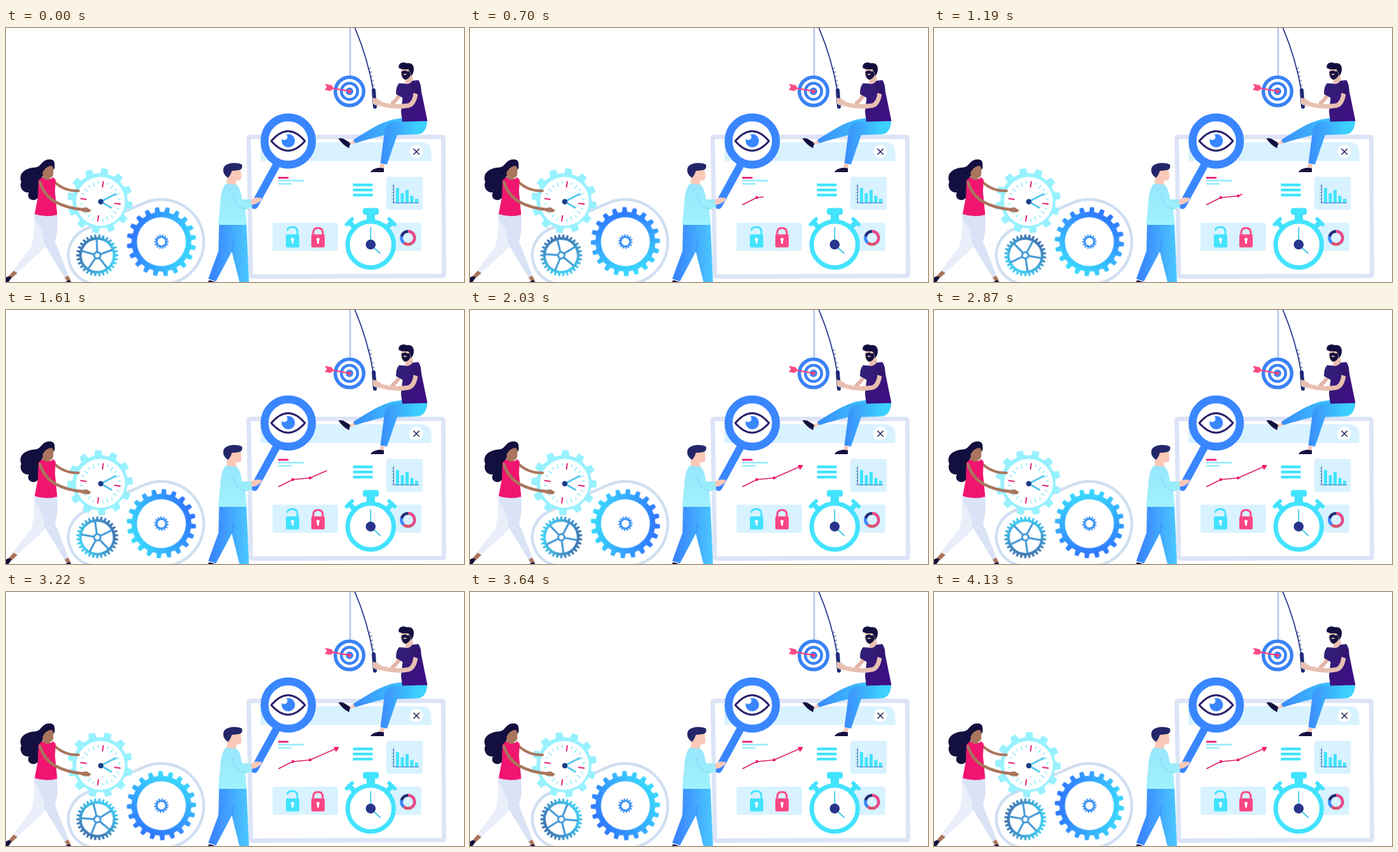
Write an HTML page that moves like this. It is 720x400 px and loops after 4.2 s.

```html
<!DOCTYPE html>
<html lang="en">
<head>
<meta charset="utf-8">
<title>Teamwork</title>
<style>
  html, body { margin: 0; width: 100%; height: 100%; overflow: hidden; background: #fff; }
  svg { display: block; width: 720px; height: 400px; }
  .spin { transform-origin: 0 0; animation: spin 4.2s steps(60) infinite; }
  #wipe rect { transform-origin: 428px 0; animation: wipe 4.2s infinite; }
  .line { fill: none; stroke-linecap: round; stroke-linejoin: round; }
  .navy { fill: #13103f; }
  .pale { fill: #d9f2ff; }
  .cyan { fill: #42e3ff; }
  .pink { fill: #f0166f; }
  .blue { fill: #3a86ff; }
  .brown { fill: #a9755d; }
  .peach { fill: #fbc8b8; }
  .tan { fill: #e8c0b0; }
  @keyframes spin { to { transform: rotate(360deg); } }
  @keyframes wipe {
    0% { transform: scaleX(0); animation-timing-function: steps(29); }
    48.3333%, 100% { transform: scaleX(1); }
  }
</style>
</head>
<body>
<svg viewBox="0 0 720 400">
  <defs>
    <linearGradient id="bigFill" gradientTransform="rotate(15 .5 .5)">
      <stop offset=".05" stop-color="#2f78ff"/><stop offset="1" stop-color="#3bdcff"/>
    </linearGradient>
    <linearGradient id="smallFill" gradientTransform="rotate(20 .5 .5)">
      <stop offset="0" stop-color="#3d6fae"/><stop offset="1" stop-color="#43d4fa"/>
    </linearGradient>
    <linearGradient id="jeans">
      <stop offset=".1" stop-color="#3985fd"/><stop offset="1" stop-color="#4bc8ff"/>
    </linearGradient>
    <linearGradient id="seat">
      <stop offset="0" stop-color="#3b8cfa"/><stop offset=".8" stop-color="#3cd0ff"/>
    </linearGradient>
    <linearGradient id="purple" x2="1" y2="1">
      <stop offset="0" stop-color="#2e2372"/><stop offset="1" stop-color="#420a86"/>
    </linearGradient>
    <linearGradient id="aqua" x2="0" y2="1">
      <stop offset="0" stop-color="#98e6fb"/><stop offset="1" stop-color="#a0f2fe"/>
    </linearGradient>
    <clipPath id="wipe"><rect x="428" y="236" width="96.6" height="48"/></clipPath>
  </defs>

  <!-- window -->
  <path d="M384 171.500H685Q687.500 171.500 687.500 174L688.500 388Q688.500 390.500 686 390.500L387.500 391.500Q385 391.500 385 389L381.500 174Q381.500 171.500 384 171.500Z" fill="#fff" stroke="#dce4f6" stroke-width="7"/>
  <path class="pale" d="M400 180H654Q668.500 181 668.500 196V209.500H400Z"/>
  <circle cx="645" cy="194.500" r="10.500" fill="#fff"/>
  <path class="line" d="M641 190.500l8.500 8.500m0-8.500l-8.500 8.500" stroke="#1c2058" stroke-width="1.500"/>
  <path class="pink" d="M428 234.500h16v2.800h-16z"/>
  <path d="M428 239h41v2.700h-41zM428 244h21v2.700h-21z" fill="#9cecff"/>
  <path class="cyan" d="M545.500 245h31v4.200h-31zM545.500 253h31v4.200h-31zM545.500 261h31v4.200h-31z"/>

  <g clip-path="url(#wipe)">
    <path class="line" d="M428 278.500L451 267 478 264.500 519 246.500" stroke="#e01c6c" stroke-width="1.600"/>
    <circle class="pink" cx="451" cy="267" r="2.300"/>
    <circle class="pink" cx="478" cy="264.500" r="2.300"/>
    <path class="pink" d="M524 244.300L515 244 518.800 252Z"/>
  </g>

  <rect class="pale" x="598" y="234.500" width="57" height="52" rx="3"/>
  <path class="line" d="M609.500 246v29.500h39.500M607 249h2.500m-2.500 5h2.500m-2.500 5h2.500m-2.500 5h2.500m-2.500 5h2.500m-2.500 5h2.500" stroke="#3b75c4"/>
  <path class="cyan" d="M613 252h5v23h-5zM620.500 260h5v15h-5zM628 255h5v20h-5zM635.500 264.500h5v10.500h-5zM643 269h5v6h-5z"/>

  <rect class="pale" x="419" y="306.500" width="103" height="44.500" rx="3"/>
  <g id="locks">
    <path class="line" d="M442.500 318Q443.500 313.500 450 313.500Q457.500 313.500 458 320V326" stroke="#42e3ff" stroke-width="3"/>
    <rect class="cyan" x="440" y="325" width="21" height="20.500" rx="2"/>
    <path class="line" d="M483 326V322Q483 315 490.500 315T498 322V326" stroke="#fa4684" stroke-width="3"/>
    <rect x="480" y="325" width="21" height="20.500" rx="2" fill="#fa4684"/>
    <path d="M449 334.500h3v5h-3zM489 334.500h3v5h-3z" fill="#fff"/>
    <circle cx="450.500" cy="333" r="2.600" fill="#fff"/><circle cx="490.500" cy="333" r="2.600" fill="#fff"/>
  </g>

  <rect class="pale" x="600" y="306.500" width="53" height="44.500" rx="3"/>
  <g fill="none" stroke-width="4.500">
    <circle cx="632" cy="330.500" r="10.300" stroke="#42d9fb"/>
    <path d="M632 320.200A10.300 10.300 0 0 1 638 338.900" stroke="#f04481"/>
    <path d="M638 338.900A10.300 10.300 0 0 1 625 338" stroke="#e0506f"/>
    <path d="M625 338A10.300 10.300 0 0 1 622 328" stroke="#3a86ff"/>
    <path d="M622 328A10.300 10.300 0 0 1 632 320.200" stroke="#2a2c70"/>
  </g>

  <!-- stopwatch -->
  <path class="line" d="M540 306l9 9M606.500 306l-9 9" stroke="#42e3ff" stroke-width="8" stroke-linecap="butt"/>
  <path class="line" d="M535.500 309.500l8.500-8.500M611 309.500l-8.500-8.500" stroke="#42e3ff" stroke-width="6"/>
  <path class="cyan" d="M567 290h13v14h-13z"/>
  <rect class="cyan" x="561" y="283.500" width="25" height="10.500" rx="4"/>
  <circle cx="573.300" cy="341" r="36.200" fill="#fff" stroke="#42e3ff" stroke-width="7"/>
  <path class="line" d="M573.300 341V314.500M573.300 341L588 355" stroke="#3bcbe6" stroke-width="1.800"/>
  <circle cx="573.300" cy="341" r="7.800" fill="#27358c"/>

  <!-- angler -->
  <path class="line" d="M541 0V77" stroke="#6b8ed6" stroke-width="1.200"/>
  <path class="line" d="M548.500 0Q568 45 578 101" stroke="#273a8f" stroke-width="1.800"/>
  <path class="line" d="M570 64l3-1M572 70l3-1M573 77l3-1M574.500 84l3-1M576 91l3-1" stroke="#273a8f"/>
  <path class="line" d="M578 98L580 124" stroke="#1f2a78" stroke-width="6" stroke-linecap="butt"/>
  <circle cx="540" cy="99.700" r="22.300" fill="#fff" stroke="#3a82f5" stroke-width="5.500"/>
  <circle cx="540" cy="99.700" r="12.800" fill="#fff" stroke="#3a82f5" stroke-width="4.500"/>
  <circle class="blue" cx="540" cy="99.700" r="6"/>
  <circle cx="540" cy="99.700" r="3" fill="#f73f78"/>
  <path class="line" d="M511 94.500L540 99.700" stroke="#f73f78" stroke-width="2.200"/>
  <path d="M501 88L512 90 515 95 510.500 99 501 97.500 504.500 93Z" fill="#fb4c80"/>

  <path d="M662 147L626 142C600 143 584 152 545.500 176.500L549 181.500C580 172 605 166 628 160Z" fill="url(#seat)"/>
  <path d="M662 146L630 146C605 146 597 151 595 164L588.500 213 599 215 615 168.500 648 167.500C658 166 662 156 662 146Z" fill="url(#seat)"/>
  <path class="navy" d="M522.500 174Q529 172.500 534 176.500L543 182Q539 184 539.500 189.500Q529 184 522.500 174ZM573 227Q575 222 586 220L594 220.500V227Z"/>
  <path class="peach" d="M540 181l6-4 3 4.500-7 2zM588 213.500l7 1-1 6-6-.5z"/>
  <path class="line" d="M619 104Q616 112 608 118" stroke="#e3b4a6" stroke-width="6"/>
  <path class="tan" d="M628 76h11l1 10q-6 5-12 3z"/>
  <path class="tan" d="M621 62H638L638 75Q634 82 627 81.500Q621.500 80 621.500 73Z"/>
  <path d="M627 87.500Q634 90 639 83L648 82Q652 85 653 100L662.500 146.500 623 147.500 621 132 623.500 110 613 104Q613 92 618 87Z" fill="url(#purple)"/>
  <path class="navy" d="M617.500 63C616 55 624 52.500 630 55.500C640 54 643 62 640 71L637 76Q636 68 632 65Q623 66 617.500 63Z"/>
  <path class="navy" d="M621.500 69Q627 65.500 631 68.500L634.500 68 636 74Q633 81 627.500 81.500Q621.500 79 621.500 69Z"/>
  <path class="tan" d="M624 73q4-2 6.500 0-3.500 2-6.500 0z"/>
  <path class="line" d="M644 103Q642 119 633 122Q611 126 587 119" stroke="#e8c0b0" stroke-width="7"/>
  <path class="tan" d="M576.500 110Q584 110 590 116L589 122Q581 123 577 119Z"/>
  <path d="M635 100L651.500 106 652 90 639 87Z" fill="#32176f"/>

  <!-- belt and gears -->
  <path class="line" d="M143 403A45 45 0 0 1 124.700 316.900L216.700 275.800A67 67 0 1 1 244 404" stroke="#cfdff0" stroke-width="4.500"/>
  <g id="gears"></g>

  <!-- clock face -->
  <circle cx="148.500" cy="273" r="38.500" fill="#fff"/>
  <g id="ticks" transform="translate(148.500 273)"></g>
  <path class="line" d="M149 273.500L172 261.500M149 273.500L165.500 283" stroke="#55c8ee" stroke-width="3"/>
  <circle cx="149" cy="273.500" r="4.200" fill="#1d3c86"/>

  <!-- woman -->
  <path class="navy" d="M57 212C62 206 75 205 76 212C77 216 76 222 74 224L64 222 56 236C58 252 55 269 44 271C36 271 33 265 36 259C25 260 21 249 24 242C19 229 30 222 41 220C50 220 53 217 57 212Z"/>
  <path class="line" d="M77 243Q92 257 114 256.500" stroke="#a9755d" stroke-width="4"/>
  <path class="brown" d="M57 222Q62 213 74 217L74.500 230Q73 236 69 236L71 242H56L58 234Z"/>
  <path class="navy" d="M56 222Q57 208 68 207Q77 207 76.500 222L72 217Q63 217 57 228Z"/>
  <path d="M45 291H80Q83 318 76 338L62 344Q52 355 17 386L11 382 40 344Q46 322 44 300Z" fill="#e9eefa"/>
  <path d="M45 291H80Q83 318 77 336L98.500 390 92 393 61 342Q58 316 45 300Z" fill="#dae3f5"/>
  <path class="brown" d="M12 382l6 4-9 8-5-3zM92 393l6-3 4 8-5 2z"/>
  <path class="navy" d="M0 393Q5 389 9 393L4 400H0ZM93 400l6-3 4 3z"/>
  <path class="pink" d="M51 240L57 235Q65 243 74 235L78 239 77 258 80.500 294Q63 299 45 293L50 267Z"/>
  <path class="line" d="M53.500 243Q60 264 78 274T122 286" stroke="#a9755d" stroke-width="4.500"/>
  <path class="brown" d="M118 284L127 282.500 134 287 130 290.500 119 289Z"/>

  <!-- magnifier -->
  <path class="line" d="M430 207L390.500 279" stroke="#3a86ff" stroke-width="12" stroke-linecap="butt"/>
  <circle cx="443.700" cy="178" r="37.300" fill="#fff" stroke="#3a86ff" stroke-width="12.500"/>
  <path class="line" d="M417 178Q443.500 147 470 178Q443.500 208.500 417 178Z" stroke="#25206a" stroke-width="2.800"/>
  <circle class="blue" cx="443.800" cy="177.500" r="10.500"/>
  <circle cx="437.500" cy="171.500" r="5" fill="#fff"/>

  <!-- man -->
  <path d="M335 308H378L382 400H367L355 352 330 399 318 395 334 351Z" fill="url(#jeans)"/>
  <path d="M355 352L358 336" class="line" stroke="#3581ee"/>
  <path class="navy" d="M317 400l3-3 9 3z"/>
  <path class="peach" d="M348 222H369L370 236Q369 241 362 240L361.500 249 347 248Z"/>
  <path d="M341.500 223C342 214 357 209.500 371 215Q373 223 365 224L355 225Q353 232 349 236Q341 231 341.500 223Z" fill="#232768"/>
  <path class="peach" d="M384 271L392 267 402 267.500 401 272 393 277 385 279Z"/>
  <path d="M346 245L363 247Q369 253 371 270L385 270 387 283 376 286 378.500 310H333.500L337 275Q338 252 346 245Z" fill="url(#aqua)"/>
  <path class="line" d="M357 262Q358 281 377 285" stroke="#84d9f2" stroke-width="1.200"/>
</svg>
<script>
  const NS = 'http://www.w3.org/2000/svg';
  const add = (parent, tag, attrs) => {
    const el = document.createElementNS(NS, tag);
    for (const key in attrs) el.setAttribute(key, attrs[key]);
    return parent.appendChild(el);
  };
  const polar = (r, a) => (r * Math.cos(a)).toFixed(2) + ' ' + (r * Math.sin(a)).toFixed(2);
  const ring = r => `M${r} 0A${r} ${r} 0 1 0 ${-r} 0A${r} ${r} 0 1 0 ${r} 0Z`;

  // Toothed outline; foot and tip are half widths as a share of the pitch.
  function toothed(count, base, outer, foot, tip, phase) {
    const pitch = 2 * Math.PI / count, points = [];
    for (let i = 0; i < count; i++) {
      const a = phase * Math.PI / 180 + i * pitch;
      points.push(polar(base, a - foot * pitch), polar(outer, a - tip * pitch),
                  polar(outer, a + tip * pitch), polar(base, a + foot * pitch));
    }
    return 'M' + points.join('L') + 'Z';
  }

  function gear(x, y, fill, d) {
    const holder = add(gears, 'g', { transform: `translate(${x} ${y})` });
    const wheel = add(holder, 'g', { class: 'spin' });
    add(wheel, 'path', { d, fill, 'fill-rule': 'evenodd' });
    return wheel;
  }

  const gears = document.getElementById('gears');
  const big = gear(244.3, 336.5, 'url(#bigFill)', toothed(20, 47, 54.5, .28, .18, 10.5) + ring(38.5));
  add(big, 'path', { d: toothed(14, 9, 11.5, .32, .2, 0) + ring(6), fill: '#3b92f5', 'fill-rule': 'evenodd' });

  const small = gear(143.5, 358, 'url(#smallFill)', toothed(30, 28.5, 33, .32, .2, 0) + ring(24.5));
  for (let i = 0; i < 5; i++)
    add(small, 'path', { d: 'M5 0H25.500', transform: `rotate(${52 + i * 72})`, stroke: '#3f97d6', 'stroke-width': 3 });
  add(small, 'circle', { r: 5, fill: '#fff', stroke: '#3f97d6', 'stroke-width': 3 });

  gear(147.8, 272, '#97f1ff', toothed(12, 43.5, 51.5, .27, .19, 8.5));

  const ticks = document.getElementById('ticks');
  for (let i = 0; i < 24; i++) {
    const main = i % 6 === 0, mid = i % 2 === 0;
    add(ticks, 'path', {
      d: `M${main ? 22 : mid ? 25 : 28} 0H32`,
      transform: `rotate(${8 + i * 15})`,
      stroke: main ? '#e5226f' : '#8feaff',
      'stroke-width': main ? 2 : 1.6
    });
  }
</script>
</body>
</html>
```
